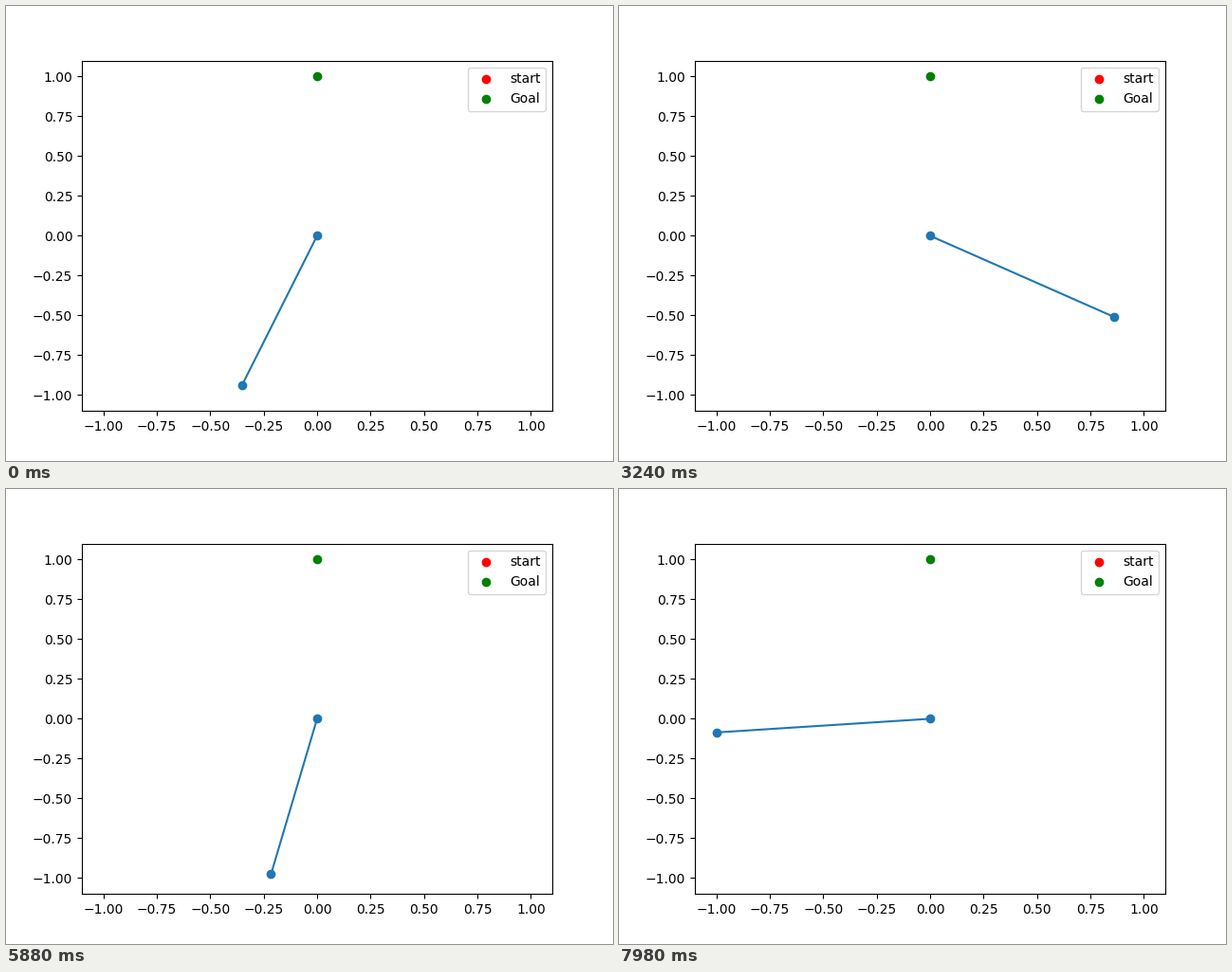
These frames come from a looping animation (640 px wide and 480 px high, 8 s). A matplotlib script:

```python
import numpy as np
import matplotlib.pyplot as plt
from matplotlib.animation import FuncAnimation

TICK_MS = 20
LOOP_MS = 8000

# Swing angle in radians from straight down (positive = right) at some steps
STEPS = np.array([0, 17, 26, 34, 52, 70, 88, 106, 124, 142, 160, 171])
ANGLES = np.array([-0.358, -0.2318, 0.0038, 0.2185, 0.7309, 1.0361,
                   0.846, 0.3456, -0.160, -0.6877, -1.1923, -1.485])
START_SLOPE, END_SLOPE = -0.008, -0.0262


def spline_slopes(x, y, first, last):
    """Slopes of the clamped cubic spline through the points."""
    h = np.diff(x)
    d = np.diff(y) / h
    n = len(x)
    a = np.eye(n)
    b = np.zeros(n)
    b[0], b[-1] = first, last
    for i in range(1, n - 1):
        a[i, i - 1:i + 2] = h[i], 2 * (h[i - 1] + h[i]), h[i - 1]
        b[i] = 3 * (h[i] * d[i - 1] + h[i - 1] * d[i])
    return np.linalg.solve(a, b)


SLOPES = spline_slopes(STEPS, ANGLES, START_SLOPE, END_SLOPE)


def angle_at(step):
    i = min(np.searchsorted(STEPS, step, side="right") - 1, len(STEPS) - 2)
    h = STEPS[i + 1] - STEPS[i]
    s = (step - STEPS[i]) / h
    return ((1 + 2 * s) * (1 - s) ** 2 * ANGLES[i]
            + s * (1 - s) ** 2 * h * SLOPES[i]
            + s * s * (3 - 2 * s) * ANGLES[i + 1]
            + s * s * (s - 1) * h * SLOPES[i + 1])


def step_at(tick):
    """Poses are held for 20, 100 and 20 ms in turn."""
    group, part = divmod(tick, 7)
    return 3 * group + (part > 0) + (part > 5)


fig, ax = plt.subplots(figsize=(6.4, 4.8), dpi=100)
ax.scatter([], [], color="red", label="start")
ax.scatter([0], [1], color="green", label="Goal")
rod, = ax.plot([], [], "o-", color="C0")
ax.set_xlim(-1.1, 1.1)
ax.set_ylim(-1.1, 1.1)
ax.legend(loc="upper right")


def update(tick):
    theta = angle_at(step_at(tick))
    rod.set_data([0, np.sin(theta)], [0, -np.cos(theta)])
    return rod,


anim = FuncAnimation(fig, update, frames=LOOP_MS // TICK_MS,
                     init_func=lambda: update(0), interval=TICK_MS,
                     repeat=True, repeat_delay=0)
plt.show()
```
